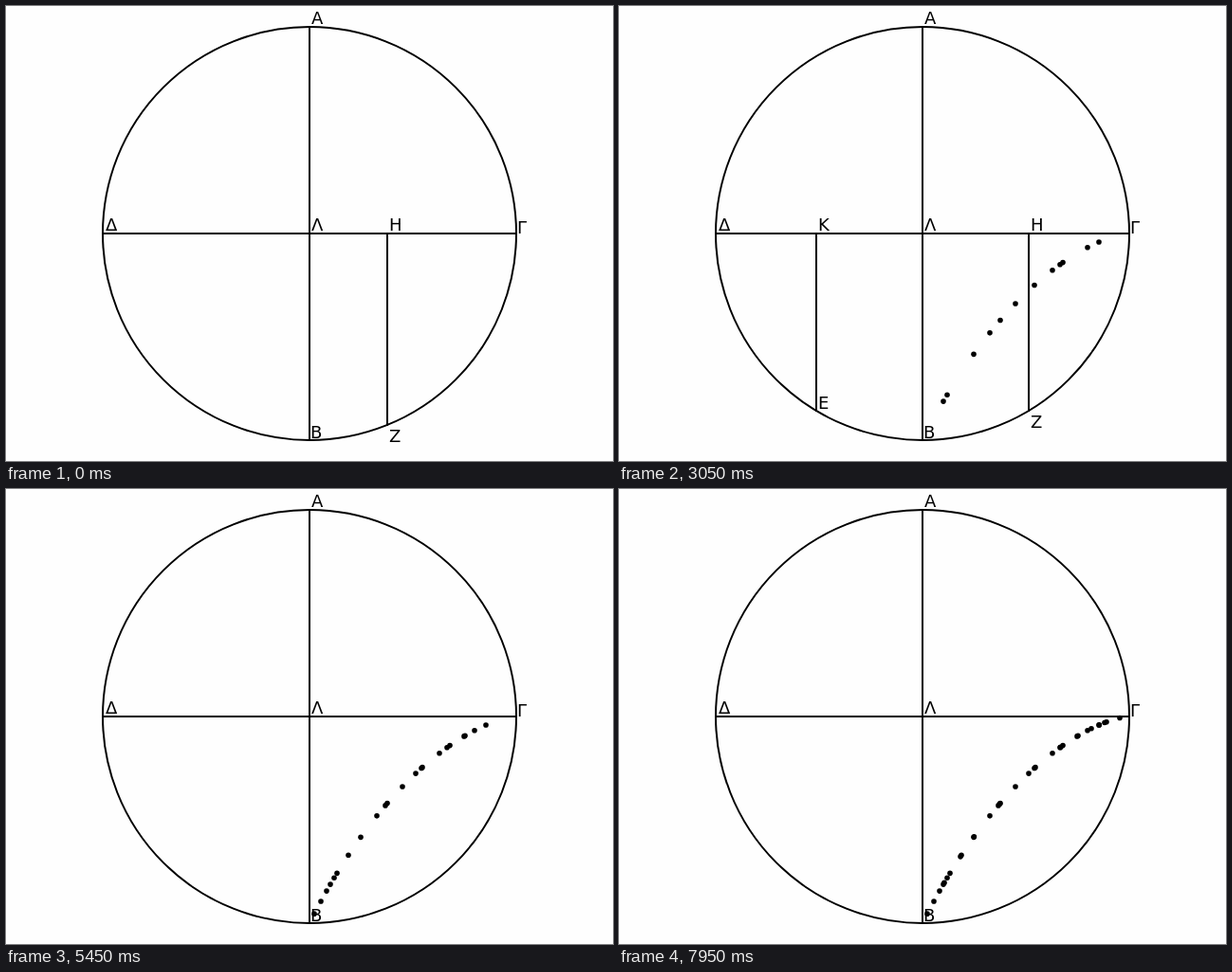
An HTML page for the animation above (8 s loop, 640x480 px).

```html
<!DOCTYPE html>
<html lang="el">
<head>
<meta charset="utf-8">
<title>Cissoid construction</title>
<style>
html, body { margin: 0; width: 100%; height: 100%; overflow: hidden; background: #fefefe; }
svg { display: block; width: 640px; height: 480px; }
text { font: 18px "DejaVu Sans", sans-serif; }
.lines { fill: none; stroke: #000; stroke-width: 2; stroke-linecap: square; }
</style>
</head>
<body>
<svg viewBox="0 0 640 480">
  <g class="lines">
    <circle cx="320" cy="240" r="218"/>
    <path d="M320 22V458M102 240H538"/>
    <path id="build"/>
  </g>
  <g id="dots"></g>
  <text x="322" y="19">Α</text>
  <text x="321" y="456">Β</text>
  <text x="539" y="240">Γ</text>
  <text x="105" y="237">Δ</text>
  <text x="322" y="237">Λ</text>
  <g id="labels"></g>
</svg>
<script>
const CX = 320, CY = 240, R = 218, RIGHT = CX + R;
const STEP = 50, CYCLE = 5 * STEP, LOOP = 8000;

// Position of H in each construction
const XS = [
  402, 506, 468, 457, 494, 342, 346, 418, 391, 465, 374,
  438, 432, 483, 361, 439, 338, 484, 349, 332, 400,
  325, 465.5, 360, 343, 506.3, 374.4, 498, 528, 401.5, 514, 512
];

const add = (parent, tag, attrs) => {
  const el = document.createElementNS("http://www.w3.org/2000/svg", tag);
  for (const k in attrs) el.setAttribute(k, attrs[k]);
  return parent.appendChild(el);
};
const byId = id => document.getElementById(id);

// Z and E lie on the circle, theta where HZ meets the line from E to the right end
const shapes = XS.map(x => {
  const mirror = 2 * CX - x;
  const drop = Math.sqrt(R * R - (x - CX) ** 2);
  return { x, mirror, y: CY + drop, theta: CY + drop * (RIGHT - x) / (RIGHT - mirror) };
});

const dots = shapes.map(s => add(byId("dots"), "circle", { cx: s.x, cy: s.theta, r: 2.8 }));
const labels = {};
for (const name of "ΗΖΚΕΘ") {
  labels[name] = add(byId("labels"), "text", {});
  labels[name].textContent = name;
}

function place(name, x, y, visible) {
  const el = labels[name];
  el.setAttribute("x", Math.round(x + 2.2));
  el.setAttribute("y", Math.round(y));
  el.style.display = visible ? "" : "none";
}

let last = -1;
function draw(time) {
  const step = Math.floor((time % LOOP) / STEP);
  if (step === last) return;
  last = step;
  const perCycle = CYCLE / STEP;
  const index = Math.floor(step / perCycle);
  const phase = step % perCycle;
  const { x, mirror, y, theta } = shapes[index];
  const open = phase < 4;

  let d = "";
  if (open) d += `M${Math.round(x)} ${CY}V${y}`;
  if (open && phase >= 1) d += `M${Math.round(mirror)} ${CY}V${y}`;
  if (open && phase >= 2) d += `M${mirror} ${y}L${RIGHT} ${CY}`;
  byId("build").setAttribute("d", d);

  place("Η", x, 237, open);
  place("Ζ", x, y + 18, open);
  place("Κ", mirror, 237, open && phase >= 1);
  place("Ε", mirror, y - 2, open && phase >= 1);
  place("Θ", x, theta + 18, phase === 3);

  const count = index + (phase >= 3 ? 1 : 0);
  dots.forEach((dot, i) => { dot.style.display = i < count ? "" : "none"; });
}

const start = performance.now();
function tick() {
  draw(performance.now() - start);
  requestAnimationFrame(tick);
}
tick();
</script>
</body>
</html>
```
